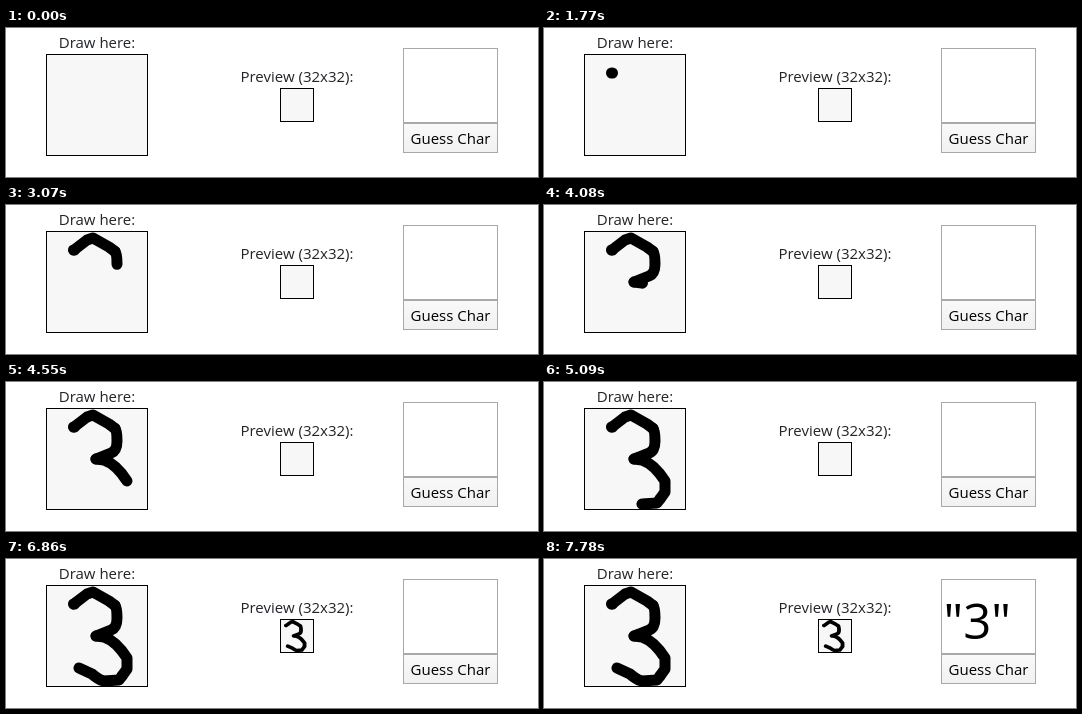
An HTML page for the animation above (9.19 s loop, 532 px wide and 149 px high).

```html
<!DOCTYPE html>
<html lang="en">
<head>
<meta charset="utf-8">
<title>Character guesser</title>
<style>
  html, body { margin: 0; width: 100%; height: 100%; overflow: hidden; background: #fff; }
  svg { display: block; width: 532px; height: 149px; }
  text { font: 15px "Open Sans", "Noto Sans", sans-serif; fill: #212529; }
  .label { text-anchor: middle; }
  .ink { fill: none; stroke: #000; stroke-width: 11; stroke-linecap: round; stroke-linejoin: round; }
  .pad { fill: #f7f7f7; stroke: #000; }
  .control { stroke: #a9a9a9; }
  #guess { font-size: 49px; fill: #000; }
</style>
</head>
<body>
<svg viewBox="0 0 532 149">
  <defs>
    <linearGradient id="face" x2="0" y2="1">
      <stop stop-color="#f9f9f9"/>
      <stop offset="1" stop-color="#f1f1f1"/>
    </linearGradient>
    <clipPath id="padClip"><rect x="41" y="27" width="100" height="100"/></clipPath>
    <clipPath id="previewClip"><rect x="275" y="61" width="32" height="32"/></clipPath>
  </defs>

  <text class="label" x="91" y="20">Draw here:</text>
  <rect class="pad" x="40.5" y="26.5" width="101" height="101"/>
  <g id="ink" class="ink" clip-path="url(#padClip)"></g>

  <text class="label" x="291" y="54">Preview (32x32):</text>
  <rect class="pad" x="274.5" y="60.5" width="33" height="33"/>
  <g id="preview" clip-path="url(#previewClip)">
    <path id="thumb" class="ink" transform="translate(256.2 52) scale(.35 .323)"/>
  </g>

  <rect class="control" x="397.5" y="20.5" width="94" height="74" fill="#fff"/>
  <text id="guess" x="399.5" y="79.5">"3"</text>
  <rect id="button" class="control" x="397.5" y="95.5" width="94" height="29"/>
  <text class="label" x="444.5" y="116" style="fill:#000">Guess Char</text>
</svg>
<script>
const LOOP = 9190;
const STEP = 76.8;      // time between pen samples
const TOLERANCE = 5;    // the clock ticks in 10 ms units
const byId = id => document.getElementById(id);

// The digit is drawn in bursts; ease is the exponent of the pen's progress.
const strokes = [
  { d: "M67.5 45h1", start: 1770, steps: 1, ease: 1 },
  { d: "M68 45L81 35 87 33 103 42 109 46.5", start: 2000, steps: 12, ease: 1 },
  { d: "M109 46.5Q111 49 111 59T105 71L90 77", start: 2920, steps: 10, ease: 1 },
  { d: "M90 77L98 78Q110 82 121 99V110L116 117", start: 3930, steps: 12, ease: 1.4 },
  { d: "M116 117L113 121 98 122Q93 121 86 115L73 109", start: 4850, steps: 12, ease: 0.8 }
];

for (const stroke of strokes) {
  stroke.path = document.createElementNS("http://www.w3.org/2000/svg", "path");
  stroke.path.setAttribute("d", stroke.d);
  byId("ink").append(stroke.path);
  stroke.length = stroke.path.getTotalLength();
}
byId("thumb").setAttribute("d", strokes.map(stroke => stroke.d).join(""));

const show = (element, on) => element.setAttribute("visibility", on ? "visible" : "hidden");

function drawStroke({ path, start, steps, ease, length }, t) {
  const done = Math.floor((t - start + TOLERANCE) / STEP) + 1;
  const progress = Math.min(1, Math.max(0, done / steps)) ** ease;
  path.setAttribute("stroke-dasharray", `${progress * length} ${2 * length}`);
  show(path, t >= start);
}

function render(t) {
  strokes.forEach(stroke => drawStroke(stroke, t));
  show(byId("preview"), t >= 5930);
  show(byId("guess"), t >= 7780);
  const pressed = t >= 6400 && t < 6860;
  byId("button").setAttribute("fill", pressed ? "#e5e5e5" : "url(#face)");
}

const begin = performance.now();
function tick() {
  render((performance.now() - begin) % LOOP);
  requestAnimationFrame(tick);
}
tick();
</script>
</body>
</html>
```
